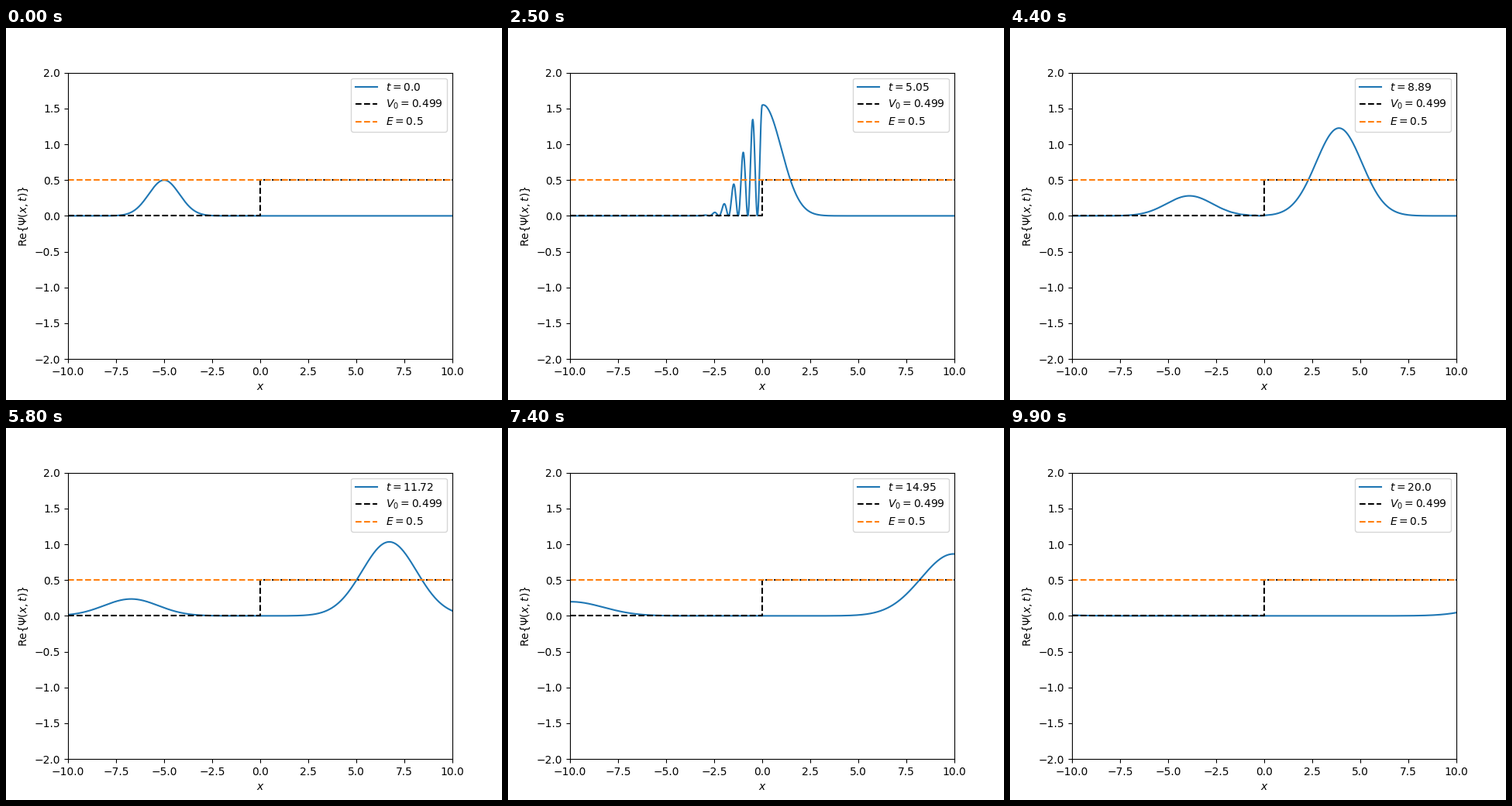
A matplotlib script for the animation above (10 s loop, 640 by 480 pixels).

```python
import numpy as np
import matplotlib.pyplot as plt
from matplotlib.animation import FuncAnimation

FRAMES = 100
T_END = 20.0
E, V0 = 0.5, 0.499

# Units: h = 1, m = 1
HBAR = 1 / (2 * np.pi)
X0 = -5.0
WIDTH2 = 4 / np.pi

p_in = np.sqrt(2 * E)
p_out = np.sqrt(2 * (E - V0))
k = p_in / HBAR
R = (p_in - p_out) / (p_in + p_out)
T = 2 * p_in / (p_in + p_out)

x = np.linspace(-10, 10, 1000)
times = np.linspace(0, T_END, FRAMES)


def envelope(x, t):
    """Amplitude of a freely spreading Gaussian packet."""
    spread = 1 + (HBAR * t / WIDTH2) ** 2
    center = X0 + p_in * t
    peak = (np.pi * WIDTH2 * spread) ** -0.25
    return peak * np.exp(-(x - center) ** 2 / (2 * WIDTH2 * spread))


def density(t):
    """Incident plus reflected wave before the step, transmitted after it."""
    incident = envelope(x, t) * np.exp(1j * k * x)
    reflected = R * envelope(-x, t) * np.exp(-1j * k * x)
    psi = np.where(x < 0, incident + reflected, T * incident)
    return np.abs(psi) ** 2


def time_label(t):
    return f"$t={round(float(t), 2)}$"


fig, ax = plt.subplots(figsize=(6.4, 4.8), dpi=100)
wave, = ax.plot(x, density(0), label=time_label(0.0))
ax.plot([-10, 0, 0, 10], [0, 0, V0, V0], "k--", label=f"$V_0={V0}$")
ax.plot([-10, 10], [E, E], "--", color="C1", label=f"$E={E}$")
ax.set_xlim(-10, 10)
ax.set_ylim(-2, 2)
ax.set_xlabel("$x$")
ax.set_ylabel(r"Re$\{\Psi(x,t)\}$")
time_text = ax.legend(loc="upper right").get_texts()[0]


def update(i):
    wave.set_ydata(density(times[i]))
    time_text.set_text(time_label(times[i]))
    return wave, time_text


anim = FuncAnimation(fig, update, frames=FRAMES, interval=100, repeat=True)
plt.show()
```
